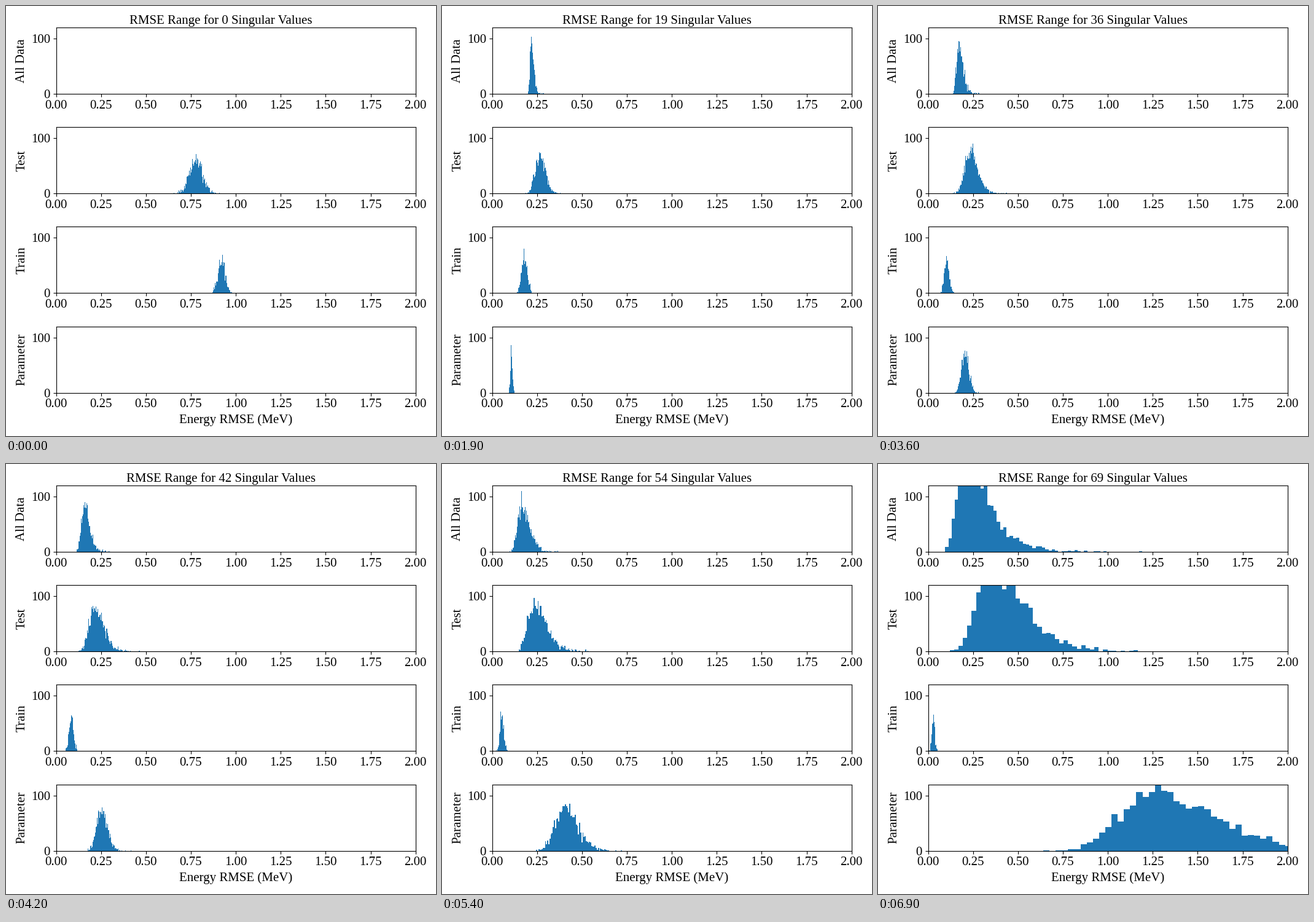
A matplotlib script for the animation above (7 s loop, 700 px wide and 700 px high).

```python
import numpy as np
import matplotlib.pyplot as plt
from matplotlib.animation import FuncAnimation

SIZE, DPI = 700, 100
FRAMES, INTERVAL = 70, 100
SAMPLES, BINS = 2000, 100
# Panel box in pixels from the top left, and the distance between panels
LEFT, TOP, WIDTH, HEIGHT, STEP = 81.65, 35.0, 585.0, 108.0, 162.2


def drop(n):
    """Sharp fall over the first few singular values."""
    return np.exp(-n)


def overfit(n):
    """Slow rise once there are too many singular values."""
    return max(n - 45, 0) ** 1.5


def burst(n):
    """Sudden widening at the very end, reaching 1 on the last frame."""
    return np.exp((n - FRAMES + 1) / 3)


# Each rule gives the median, spread, skew and peak count for n values.

def all_data(n):
    median = 0.2845 * np.exp(-n / 77) + 0.55 * drop(n) + 0.00135 * overfit(n)
    spread = 0.0058 * np.exp(n / 30) + 0.047 * burst(n)
    return median, spread, 0.3 + 0.15 * burst(n), 97 - 0.35 * n + 64 * burst(n)


def test(n):
    median = 0.28 - 3e-5 * n**2 + 0.498 * drop(n) + 0.0024 * overfit(n)
    spread = (0.017 * np.exp(n / 47) + 0.018 * np.exp(-n / 10)
              + 0.067 * burst(n))
    return median, spread, 0.005 * n, 62 + 0.35 * n + 52 * burst(n)


def train(n):
    median = np.exp(-1.2 - 0.0245 * n - 0.00014 * n**2) + 0.621 * drop(n)
    return median, 0.0195 - 0.00017 * n, 0.001 * n, 61


def parameter(n):
    median = n * (1 + np.exp(-n / 7)) / (190 * (1 - (n / 75.5) ** 3.45))
    return median, 0.0028 * n * median, 0.003 * n, 60 + 0.33 * n + 22 * burst(n)


# Label, first frame with data, rule
PANELS = [
    ("All Data", 1, all_data),
    ("Test", 0, test),
    ("Train", 0, train),
    ("Parameter", 1, parameter),
]


def histogram(rule, n, seed):
    """Bin edges and counts of a skewed bell-shaped sample."""
    median, spread, skew, peak = rule(n)
    z = np.random.default_rng(seed).standard_normal(SAMPLES)
    if skew:
        z = np.expm1(skew * z) / skew
    data = median + spread * z
    width = peak * spread * np.sqrt(2 * np.pi) / SAMPLES
    edges = data.min() + width * np.arange(BINS + 1)
    return edges, np.histogram(data, edges)[0]


def add_panel(row, label):
    bottom = SIZE - (TOP + row * STEP + HEIGHT)
    ax = fig.add_axes([v / SIZE for v in (LEFT, bottom, WIDTH, HEIGHT)])
    bars = ax.bar(np.zeros(BINS), np.zeros(BINS), color="#1f77b4")
    ax.set(xlim=(0, 2), ylim=(0, 120), yticks=(0, 100))
    ax.set_xticks(np.arange(0, 2.01, 0.25))
    ax.xaxis.set_major_formatter("{x:.2f}")
    ax.tick_params(labelsize=15)
    ax.set_ylabel(label, fontsize=15)
    return ax, bars


plt.rcParams["font.family"] = "Liberation Serif"
fig = plt.figure(figsize=(SIZE / DPI, SIZE / DPI), dpi=DPI, facecolor="white")
title = fig.suptitle("", fontsize=15)
axes, bar_sets = zip(*(add_panel(row, panel[0])
                       for row, panel in enumerate(PANELS)))
axes[-1].set_xlabel("Energy RMSE (MeV)", fontsize=15)


def update(n):
    title.set_text(f"RMSE Range for {n} Singular Values")
    for row, ((_, first, rule), bars) in enumerate(zip(PANELS, bar_sets)):
        if n < first:
            edges, counts = np.zeros(BINS + 1), np.zeros(BINS)
        else:
            edges, counts = histogram(rule, n, 100 * n + row)
        for bar, x, width, count in zip(bars, edges, np.diff(edges), counts):
            bar.set_bounds(x, 0, width, count)
            bar.set_visible(count > 0)
    return []


anim = FuncAnimation(fig, update, frames=FRAMES, interval=INTERVAL,
                     init_func=lambda: update(0), repeat=True, repeat_delay=0)
plt.show()
```
